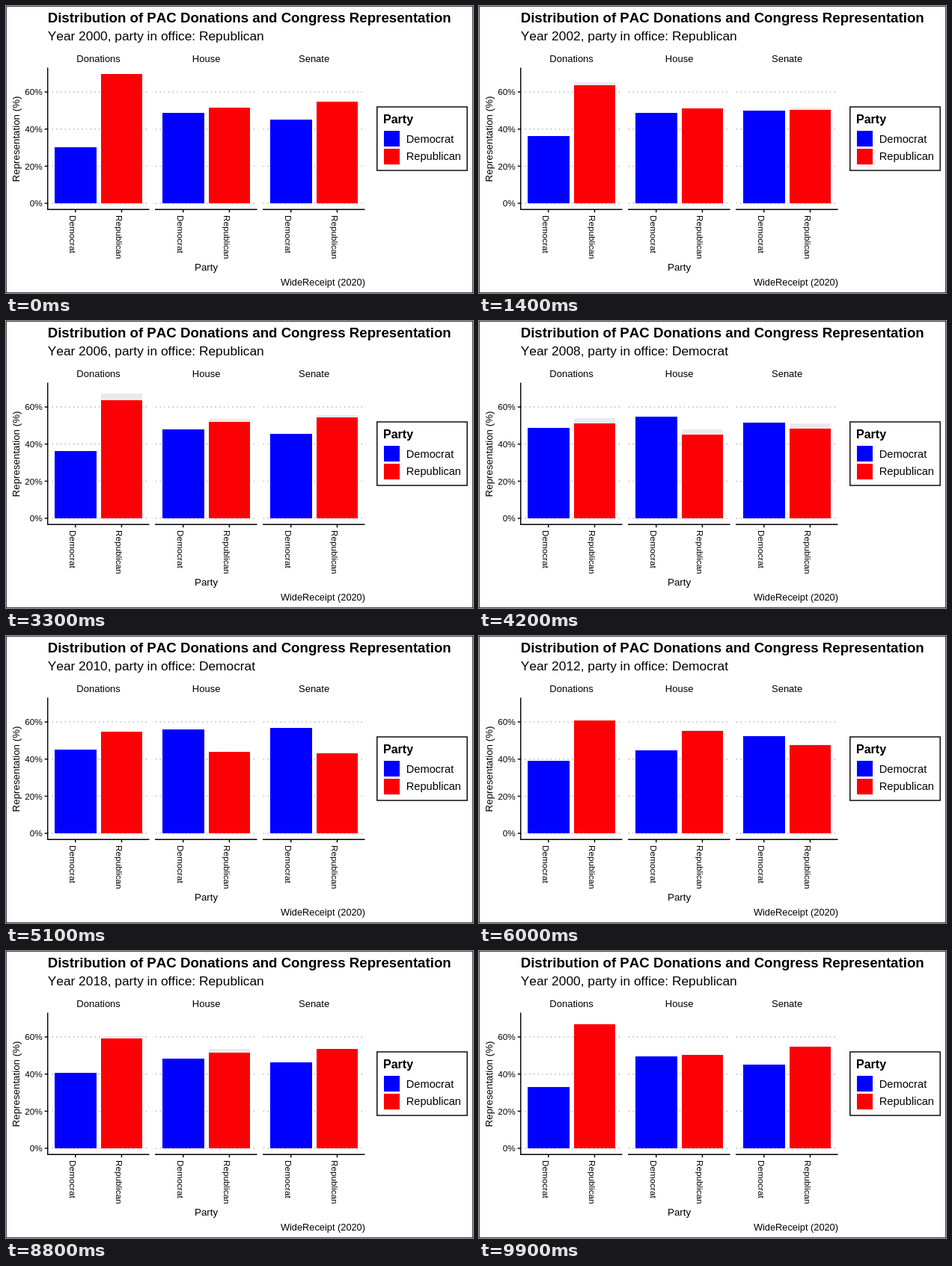
Recreate the animation shown at these times as an HTML page. Size 624 by 384 pixels, loop 10 s.

```html
<!DOCTYPE html>
<html lang="en">
<head>
<meta charset="utf-8">
<title>Donations and representation</title>
<style>
html, body { margin: 0; width: 100%; height: 100%; overflow: hidden; background: #fff; }
svg {
  display: block; width: 624px; height: 384px;
  font-family: "Liberation Sans", Arial, sans-serif; font-kerning: none;
}
</style>
</head>
<body>
<svg id="chart" viewBox="0 0 624 384"></svg>
<script>
const svg = document.getElementById("chart");
const COLORS = ["#0000ff", "#fc0006"], TRAIL = "#ebebeb";
const ZERO = 264, UNIT = 2.483;      // pixels per percent
const AXIS_Y = 272.3, LEFT = 55.7, PITCH = 144, WIDTH = 135.8, CAT = WIDTH / 2.2;
const PARTIES = ["Democrat", "Republican"];

// Democrat share in percent, every second year from 2000; the rest is Republican
const SHARES = {
  Donations: [30.2, 36.8, 33.4, 32.9, 49.4, 46.6, 39.2, 38.7, 35.9, 38.3, 44.2],
  House: [48.6, 49, 47.2, 46.5, 53.6, 59.1, 44.4, 46.2, 43.2, 44.6, 54.1],
  Senate: [45.1, 50, 48.5, 44.4, 50, 58.2, 52, 54.1, 44.9, 46.9, 45.9]
};
const COUNT = SHARES.House.length;

function add(tag, attrs, text) {
  const el = document.createElementNS("http://www.w3.org/2000/svg", tag);
  for (const key in attrs) el.setAttribute(key, attrs[key]);
  if (text) el.textContent = text;
  return svg.appendChild(el);
}
const label = (text, x, y, size, extra) =>
  add("text", { x, y, "font-size": size, ...extra }, text);
const line = (x1, y1, x2, y2, extra) =>
  add("line", { x1, y1, x2, y2, stroke: "#000", "stroke-width": 1.42, ...extra });
const block = (x, y, width, height, fill) =>
  add("rect", { x, y, width, height, fill, "shape-rendering": "crispEdges" });
const frame = (x, y, width, height) =>
  add("rect", { x, y, width, height, fill: "#fff", stroke: "#000", "stroke-width": 1.42 });
const middle = { "text-anchor": "middle" };
const end = { "text-anchor": "end" };
const bold = { "font-weight": "bold" };

function eachGrid(paint) {
  for (let v = 0; v <= 60; v += 20) paint(ZERO - v * UNIT, v);
}

frame(0, 0, 624, 384);
label("Distribution of PAC Donations and Congress Representation", 55.7, 22, 18.67, bold);
const subtitle = label("", 55.7, 46, 17.33);

const bars = [];
Object.entries(SHARES).forEach(([name, shares], p) => {
  const x0 = LEFT + p * PITCH;
  label(name, x0 + WIDTH / 2, 75, 13, middle);
  eachGrid(y => line(x0, y, x0 + WIDTH, y, { stroke: "#b4b4b4", "stroke-dasharray": "1.42 4.27" }));
  PARTIES.forEach((party, j) => {
    const mid = x0 + CAT * (0.6 + j);
    const column = fill => block(mid - CAT * 0.45, ZERO, CAT * 0.9, 0, fill);
    const values = j ? shares.map(s => 100 - s) : shares;
    bars.push({ values, trail: j && column(TRAIL), el: column(COLORS[j]) });
    line(mid, AXIS_Y, mid, AXIS_Y + 4);
    label(party, 0, 0, 11.73, { transform: `translate(${mid - 7.6} 280) rotate(90)` });
  });
  line(x0 - 0.7, AXIS_Y, x0 + WIDTH, AXIS_Y);
});

line(LEFT, 82.5, LEFT, AXIS_Y + 0.7);
eachGrid((y, v) => {
  line(LEFT - 4, y, LEFT, y);
  label(v + "%", 48.7, y + 4.3, 11.73, end);
});
label("Representation (%)", 0, 0, 13.33, { ...middle, transform: "translate(18 178) rotate(-90)" });
label("Party", LEFT + PITCH + WIDTH / 2, 354, 13.33, middle);
label("WideReceipt (2020)", 480, 374, 12.8, end);

frame(495.8, 135, 120.4, 85);
label("Party", 504, 157, 16, bold);
PARTIES.forEach((party, j) => {
  block(505, 167 + j * 24, 21, 21, COLORS[j]);
  label(party, 534.7, 183 + j * 23, 14.67);
});

const wrap = i => (i + COUNT) % COUNT;
const stepsOf = i => i < 2 ? 6 : 5;
const startOf = i => 4 + 9 * i + Math.min(i, 2);   // in tenths of a second

// Value at step k of the change from year i to the next
const valueAt = (values, i, k) =>
  values[i] + (values[wrap(i + 1)] - values[i]) * k / stepsOf(i);

// Pale remainder of the step before, kept through the hold
function trailAt(values, i, k) {
  if (k > 1) return valueAt(values, i, Math.max(0, k - stepsOf(i) + 4));
  const last = wrap(i - 1);
  return Math.max(values[i], valueAt(values, last, 4));
}

function setTop(el, value) {
  el.setAttribute("y", ZERO - value * UNIT);
  el.setAttribute("height", value * UNIT);
}

function draw(ms) {
  let tick = Math.floor(ms / 100) % 100;
  if (tick < startOf(0)) tick += 100;
  let i = COUNT - 1;
  while (startOf(i) > tick) i--;
  const steps = stepsOf(i);
  const k = Math.min(steps, tick - startOf(i) + 1);
  for (const { values, trail, el } of bars) {
    setTop(el, valueAt(values, i, k));
    if (trail) setTop(trail, trailAt(values, i, k));
  }
  const near = k * 2 >= steps ? wrap(i + 1) : i;
  const office = PARTIES[near >= 4 && near < 8 ? 0 : 1];
  subtitle.textContent = `Year ${2000 + near * 2}, party in office: ${office}`;
}

const begin = performance.now();
function loop() {
  draw(performance.now() - begin);
  requestAnimationFrame(loop);
}
loop();
</script>
</body>
</html>
```
